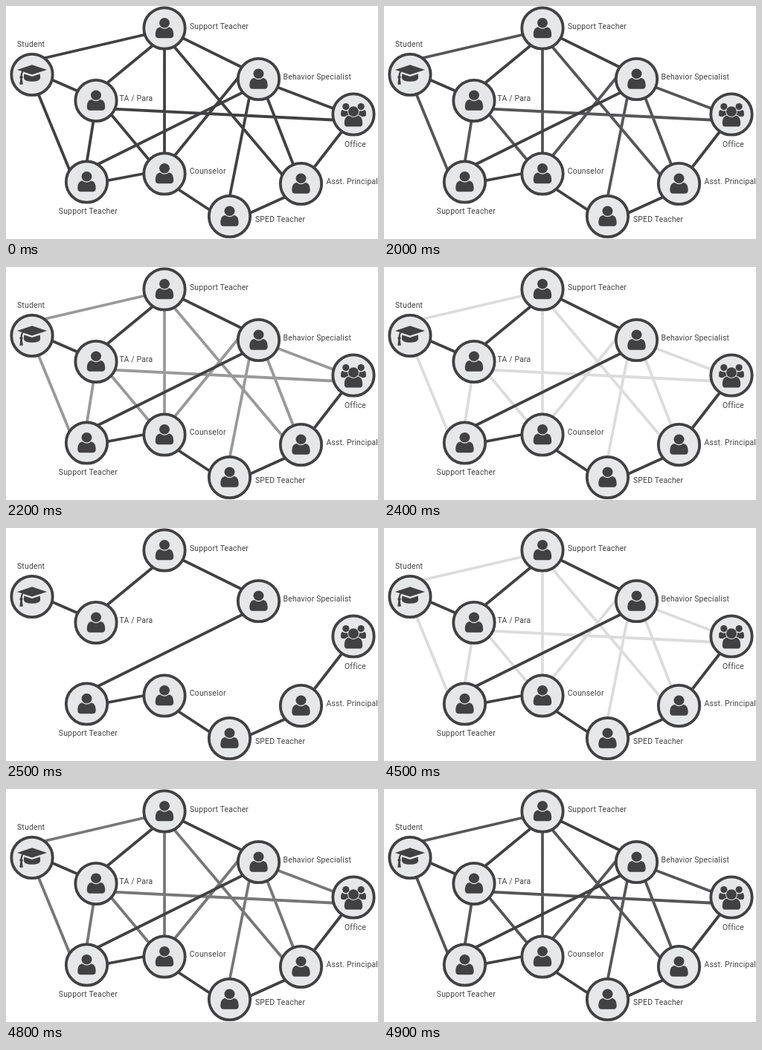
Recreate the animation shown at these times as an HTML page. Size 500 by 314 pixels, loop 5 s.

```html
<!DOCTYPE html>
<html lang="en">
<head>
<meta charset="utf-8">
<title>Support network</title>
<style>
  html, body { margin: 0; width: 100%; height: 100%; overflow: hidden; background: #fff; }
  svg { display: block; width: 100%; height: 100%; }
  .line { fill: none; stroke: #414042; stroke-width: 3.8; stroke-linecap: square; }
  .extra { animation: fade 5s step-end infinite; }
  .ring { fill: #e6e7e8; stroke: #414042; stroke-width: 3.8; }
  .icon, text { fill: #414042; }
  text { font: 10.4px Roboto, sans-serif; letter-spacing: .2px; }
  @keyframes fade {
    0% { opacity: 1; }
    40% { opacity: .89; }
    42% { opacity: .71; }
    44% { opacity: .53; }
    46% { opacity: .36; }
    48% { opacity: .18; }
    50% { opacity: 0; }
    90% { opacity: .18; }
    92% { opacity: .36; }
    94% { opacity: .53; }
    96% { opacity: .71; }
    98%, 100% { opacity: .89; }
  }
</style>
</head>
<body>
<svg viewBox="0 0 500 314">
  <defs>
    <circle id="ring" class="ring" r="27.7"/>
    <g id="person">
      <ellipse cy="-7.3" rx="7" ry="6.8"/>
      <path d="M-8 13.2Q-12.2 13.2 -12.2 8.5C-12.2 2 -9.5 -1.6 -5.7 -1.6Q0 3 5.7 -1.6C9.5 -1.6 12.2 2 12.2 8.5Q12.2 13.2 8 13.2Z"/>
    </g>
    <g id="user"><use href="#ring"/><use href="#person" class="icon"/></g>
  </defs>

  <path class="line extra" d="M52 70L185 39M44 120L85 220M117.5 155L109 208M142 147L192 207
    M148 139L439 153.5M213 58V198M227 56L371 227M311 98L228 200M326.5 126L301 255
    M352 126L385.5 212M366 110L440 138"/>
  <path class="line" d="M63 100L95 114M138 102L195 55M238 43.5L316 82M317 117L124 213
    M137 235L185 226M233 248L274 275M330 278L374 258M416 215L450 171"/>

  <use href="#user" x="213" y="30"/>
  <use href="#user" x="121" y="127.5"/>
  <use href="#user" x="339.5" y="98.5"/>
  <use href="#user" x="108.5" y="237"/>
  <use href="#user" x="213" y="226"/>
  <use href="#user" x="300.5" y="283.5"/>
  <use href="#user" x="396.5" y="239.5"/>

  <g transform="translate(35 92.5)">
    <use href="#ring"/>
    <g class="icon">
      <path d="M-20 -6.6L0 -13.3L20 -6.6L0 0Z"/>
      <path d="M-10.8 -1L0 2.4L10.8 -1L11.1 4.5Q10.5 9.2 0 9.2T-11.1 4.5Z"/>
      <path d="M-13.8 -4.6Q-15.4 -2 -15.5 1.4A2.2 2.2 0 0 0 -15.7 5.2L-16.7 13.3H-12.2L-13.2 5.2A2.2 2.2 0 0 0 -13.3 1.5Q-13 -2 -11.5 -4Z"/>
    </g>
  </g>

  <g transform="translate(467 146)">
    <use href="#ring"/>
    <g class="icon">
      <g id="side">
        <circle cx="-10.2" cy="-10.4" r="4.6"/>
        <path d="M-6.5 .9Q-9.4 1 -11.2 3.1H-13.6Q-17 3.1 -17 .3Q-17 -5.9 -14.8 -5.9Q-12 -4.4 -10.2 -4.4L-7.8 -4.8Q-8.3 -1.7 -6.5 .9Z"/>
      </g>
      <use href="#side" transform="scale(-1 1)"/>
      <use href="#person" y="3.4"/>
    </g>
  </g>

  <text x="15" y="54.5">Student</text>
  <text x="247" y="30.8">Support Teacher</text>
  <text x="152.5" y="128">TA / Para</text>
  <text x="372.5" y="99.3">Behavior Specialist</text>
  <text x="455" y="189.6">Office</text>
  <text x="70.8" y="279.6">Support Teacher</text>
  <text x="246.8" y="226.2">Counselor</text>
  <text x="335" y="291">SPED Teacher</text>
  <text x="430.5" y="239.9">Asst. Principal</text>
</svg>
</body>
</html>
```
